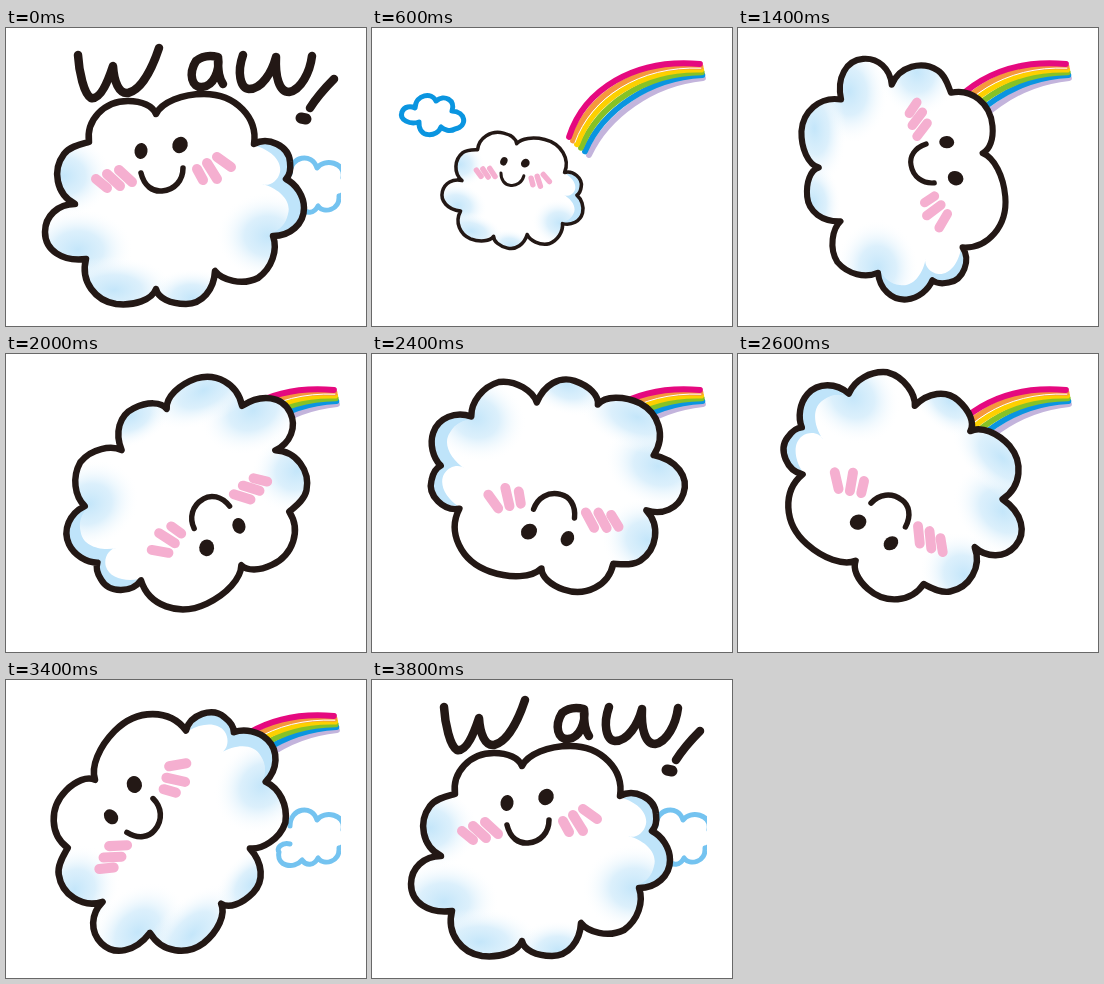
Recreate the animation shown at these times as an HTML page. Size 360 px wide and 298 px high, loop 4 s.

```html
<!DOCTYPE html>
<html lang="en">
<head>
<meta charset="utf-8">
<title>Rolling cloud</title>
<style>
  html, body { margin: 0; width: 100%; height: 100%; overflow: hidden; background: #fff; }
  svg { display: block; width: 360px; height: 298px; }
  .line { fill: none; stroke-linecap: round; stroke-linejoin: round; }
  .ink { stroke: #231815; }
</style>
</head>
<body>
<svg viewBox="0 0 360 298">
  <defs>
    <clipPath id="stage"><rect width="335" height="298"/></clipPath>
    <path id="puff" d="M83 114C80 92 98 73 122 73C136 73 147 78 150 86C156 74 176 66 198 66C230 66 252 90 248 116
      C262 108 283 118 284 134C285 142 283 148 280 151C290 156 298 168 298 180C298 196 284 208 267 208
      C272 222 266 240 252 250C236 258 216 252 209 243C208 262 196 276 180 276C164 276 152 270 150 261
      C146 272 128 278 110 276C90 273 74 254 80 231C56 234 39 222 39 204C39 188 52 176 69 176
      C50 166 46 142 58 126C64 118 76 116 83 114Z"/>
    <clipPath id="inside"><use href="#puff"/></clipPath>
    <radialGradient id="shade">
      <stop offset="0" stop-color="#c4e6fa"/>
      <stop offset=".45" stop-color="#d3ecfb" stop-opacity=".8"/>
      <stop offset="1" stop-color="#fff" stop-opacity="0"/>
    </radialGradient>
  </defs>
  <g clip-path="url(#stage)">
    <path id="leftSky" class="line" stroke="#0a95e0" stroke-width="5" d="M43 80C44 66 60 64 64 73C72 66 84 72 80 83
      C94 84 96 98 83 101C78 104 72 102 69 99C66 109 46 111 47 94C38 97 27 92 30 84C32 78 39 78 43 80Z"/>
    <path id="rightSky" class="line" stroke="#74c3f0" stroke-width="5" d="M284 146C284 128 306 124 311 140
      C318 130 340 134 337 150C344 158 340 166 333 168C334 182 318 186 312 178C308 186 300 186 296 180
      C288 190 270 186 273 172C270 168 276 162 284 164"/>
    <g id="rainbow" class="line" stroke-width="5.8"></g>
    <g id="wow" class="line ink" stroke-width="8.5" role="img" aria-label="WOW!">
      <path d="M72 27C73 44 78 66 85 70C95 72 103 50 107 38C108 54 113 66 122 65C136 62 147 38 153 20"/>
      <path d="M190 33C182 46 186 60 196 59C208 58 214 42 212 29C204 27 196 28 190 33M212 30C212 44 213 50 217 56"/>
      <path d="M237 27C231 44 234 60 243 61C256 61 266 44 270 29C269 48 273 64 283 64C295 62 304 44 306 28"/>
      <path d="M328 51C319 60 311 69 304 80"/>
      <path d="M295 90L300 91" stroke-width="11"/>
    </g>
    <g id="cloud">
      <use href="#puff" fill="#fff"/>
      <g clip-path="url(#inside)">
        <ellipse cx="58" cy="148" rx="48" ry="42" fill="url(#shade)"/>
        <ellipse cx="72" cy="222" rx="56" ry="42" fill="url(#shade)"/>
        <ellipse cx="108" cy="262" rx="62" ry="34" fill="url(#shade)"/>
        <ellipse cx="186" cy="270" rx="46" ry="30" fill="url(#shade)"/>
        <ellipse cx="262" cy="208" rx="52" ry="44" fill="url(#shade)"/>
        <path fill="#bfe4fa" d="M250 118C264 122 276 132 274 144C272 154 262 159 256 156C272 160 286 172 282 186
          C280 196 274 202 264 206L305 212V105Z"/>
      </g>
      <use href="#puff" class="line ink" stroke-width="6.5"/>
      <g class="line" stroke="#f5afd0" stroke-width="10">
        <path d="M90 151L101 160M101 146L114 158M113 142L126 154M191 141L197 152M201 135L211 151M211 129L225 139"/>
      </g>
      <g fill="#231815">
        <ellipse cx="135" cy="123" rx="6.5" ry="8" transform="rotate(8 135 123)"/>
        <ellipse cx="174" cy="117" rx="7.5" ry="8.5" transform="rotate(30 174 117)"/>
      </g>
      <path class="line ink" stroke-width="5.5" d="M135 145C138 158 147 164 156 163C169 162 177 152 177 140"/>
    </g>
  </g>
</svg>
<script>
const $ = id => document.getElementById(id);
const STEP = 200;

// x, y, angle, scale of the cloud at each step
const POSES = [
  [168, 171, 0, 1], [255, 52, -14, .25], [188, 142, 0, .4], [143, 163, 14, .545],
  [133, 190, 32, .7], [134, 181, 50, .78], [136, 168, 67, .85], [166.5, 149, 85, .94],
  [174, 146, 109, 1], [178, 144, 132, 1], [183, 143, 154.5, .99], [190, 131, 177, .99],
  [180, 129, 199, .99], [160, 132, 221.5, .99], [163, 141, 245, 1], [166, 146, 268, 1],
  [165, 148, 291, 1.01], [163, 147, 314.5, 1.01], [165, 158, 337, 1.01], [168, 171, 360, 1]
];
const LEFT_SKY = [0, .5, .75, 1, .66, .33];

// Bands are blended between the outer and inner curve
const OUTER = [197, 109, 212, 62, 262, 30, 328, 36];
const INNER = [217, 127, 235, 88, 280, 55, 331, 50];
function band(k, color, width) {
  const p = OUTER.map((v, i) => (v + (INNER[i] - v) * k).toFixed(1));
  const path = document.createElementNS("http://www.w3.org/2000/svg", "path");
  path.setAttribute("d", `M${p[0]} ${p[1]}C${p.slice(2).join(" ")}`);
  path.setAttribute("stroke", color);
  if (width) path.setAttribute("stroke-width", width);
  $("rainbow").append(path);
}
["#c3b4dc", "#0a95e0", "#86c226", "#fdd000", "#f5983c", "#e5097f"]
  .forEach((color, i) => band(1 - i / 5, color));
band(.3, "#fff", 1);

function show(id, alpha) {
  $(id).setAttribute("opacity", alpha);
}

function draw(now) {
  const n = Math.floor(now / STEP) % POSES.length;
  const [x, y, angle, scale] = POSES[n];
  const cheer = n === 0 || n === POSES.length - 1;
  $("cloud").setAttribute("transform",
    `translate(${x} ${y}) rotate(${angle}) scale(${scale}) translate(-168 -171)`);
  show("wow", cheer ? 1 : 0);
  show("rainbow", cheer ? 0 : 1);
  show("leftSky", LEFT_SKY[n] || 0);
  show("rightSky", n === 0 || n >= 16 ? 1 : 0);
}

const start = performance.now();
function tick() {
  draw(performance.now() - start);
  requestAnimationFrame(tick);
}
tick();
</script>
</body>
</html>
```
